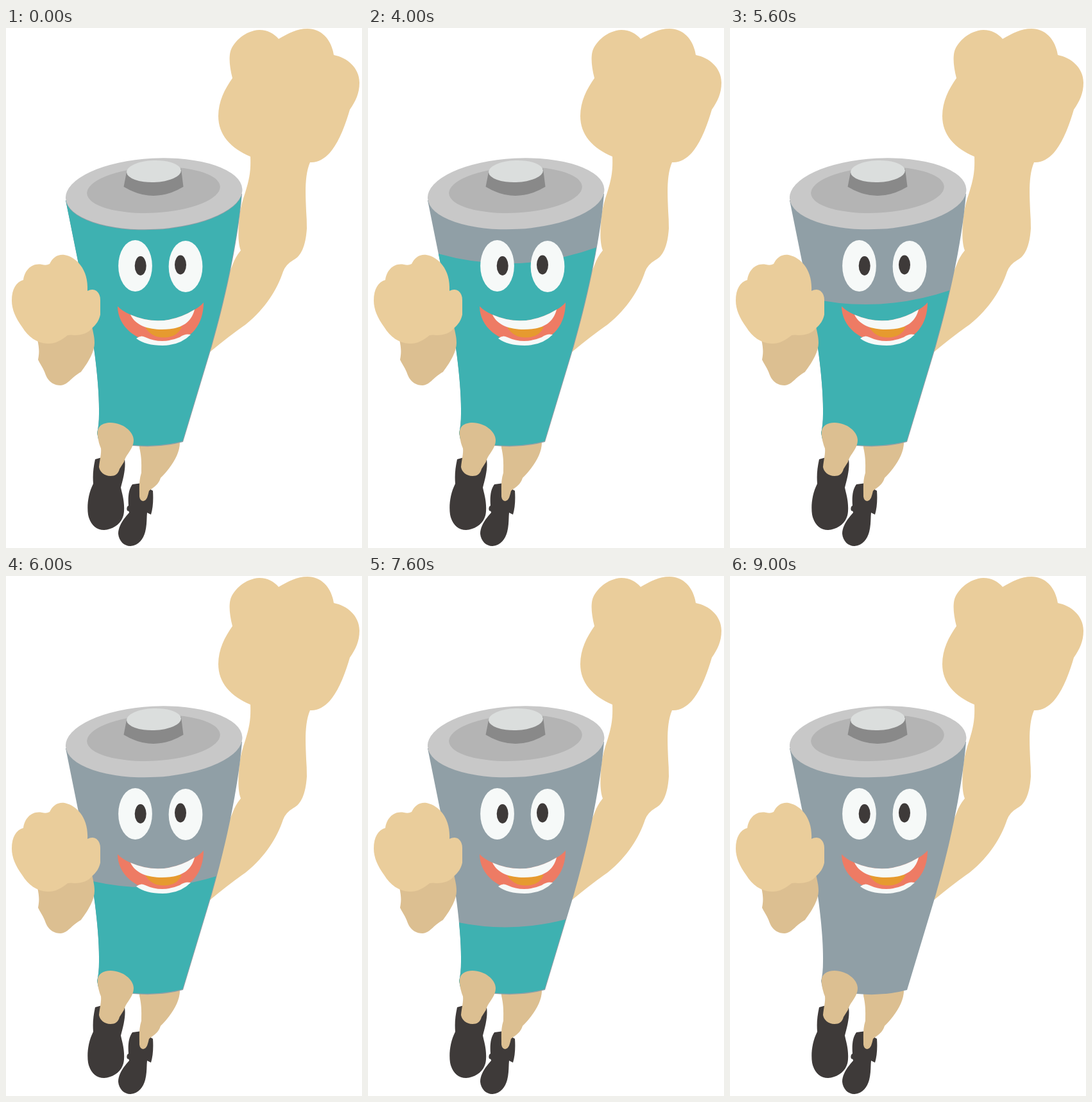
An HTML page for the animation above (10000 ms loop, 555x809 px).

```html
<!DOCTYPE html>
<html lang="en">
<head>
<meta charset="utf-8">
<title>Battery hero</title>
<style>
  html, body { margin: 0; width: 100%; height: 100%; overflow: hidden; background: #fff; }
  svg { display: block; width: 555px; height: 809px; }
  .skin { fill: #eacd9b; }
  .shade { fill: #dcbf91; }
  .boot, .pupil { fill: #3e3a39; }
  .steel { fill: #909fa6; }
  .charge { fill: #3eb1b1; }
  .white { fill: #f6f9f8; }
</style>
</head>
<body>
<svg viewBox="0 0 555 809">
  <defs>
    <path id="can" d="M93 268L112 362C130 440 146 540 145 600Q145 618 142 630L144 640Q170 650 198 650Q238 654 276 644L321 495C339 432 361 340 368 258Z"/>
    <clipPath id="canClip"><use href="#can"/></clipPath>
    <clipPath id="innerClip"><use href="#can" transform="translate(-.7 -1.3)"/></clipPath>
  </defs>

  <!-- raised arm -->
  <path class="skin" d="M381 200C350 187 331 166 331 137C331 114 341 95 353 78C349 62 347 47 350 36C355 21 373 4 395 3C408 3 418 9 425 17C441 8 453 1 470 1C494 1 508 21 511 42C532 46 551 62 551 85C551 102 545 114 536 127C529 151 519 178 505 194C496 204 485 210 474 209C465 230 467 260 468 285Q469 298 469 312C467 340 460 355 448 361Q436 368 432 379C423 406 405 436 374 461Q348 479 318 504L340 400L353 369Q357 357 366 346C361 334 362 310 364 293Q365 282 370 265C379 238 382 225 381 200Z"/>

  <!-- far leg -->
  <path class="boot" d="M197 710C191 718 190 730 191 743Q187 745 189 751Q192 751 192 754C182 765 175 776 175 787C176 798 184 806 194 806C207 805 214 795 217 784C220 772 219 763 220 754L226 757C229 747 230 735 229 720L222 716L212 708Z"/>
  <path class="shade" d="M207 630L208 653C212 670 211 680 211 692C207 705 208 715 208 729Q209 736 214 736C220 735 221 728 223 720C231 714 238 710 241 700C257 684 271 664 271 645V630Z"/>

  <use class="steel" href="#can"/>
  <g clip-path="url(#canClip)">
    <g clip-path="url(#innerClip)"><path id="charge" class="charge" d="M0 0H555V809H0Z"/></g>
    <ellipse class="steel" cx="230.7" cy="258.8" rx="137.9" ry="55.1" transform="rotate(-3 230.7 258.8)"/>
  </g>

  <!-- lid -->
  <ellipse fill="#c8c8c8" cx="230.7" cy="257.8" rx="137.9" ry="55.1" transform="rotate(-3 230.7 257.8)"/>
  <ellipse fill="#b4b4b4" cx="230" cy="252" rx="103.9" ry="35.6" transform="rotate(-3 230 252)"/>
  <path fill="#898989" d="M188 224L183.500 247Q230 275 276.500 247L273 219Z"/>
  <ellipse fill="#dbdedd" cx="230.500" cy="223" rx="42.500" ry="17" transform="rotate(-2 230.5 223)"/>

  <!-- face -->
  <ellipse class="white" cx="201.500" cy="370" rx="26.400" ry="40"/>
  <ellipse class="white" cx="280" cy="371" rx="26.400" ry="40"/>
  <ellipse class="pupil" cx="209.700" cy="370" rx="9" ry="15"/>
  <ellipse class="pupil" cx="272" cy="368.500" rx="9" ry="15"/>
  <path fill="#ee7b64" d="M174 433Q182 441 194 446Q245 468 294 438Q302 434 308 427C308 463 287 490 245 490C203 490 174 464 174 433Z"/>
  <path fill="#e69a2f" d="M217 465H274Q267 481.500 246 481.500Q226 481.500 217 465Z"/>
  <path class="white" d="M194 446Q245 468 294 438C288 462 268 469 243 469C222 469 202 463 194 446Z"/>
  <path class="white" d="M203 483Q210 477 217 481Q243 493 271 481Q279 475 288 477Q271 494 244 494Q218 494 203 483Z"/>

  <!-- front arm -->
  <path class="shade" d="M49 485C52 499 52 505 50 516C53 523 58 528 62 540C67 552 76 556 85 556C97 555 100 545 117 535C126 523 138 505 138 490C138 480 136 475 134 464Z"/>
  <path class="skin" d="M127 409Q135 405 141 409Q147 414 147 423V446C145 455 141 461 134 467C129 474 119 478 107 478Q101 477 96 478C86 486 76 492 64 491C48 490 35 481 25 465C15 451 9 438 9 424C9 406 16 395 27 392C29 377 40 365 56 368Q63 370 68 367C73 357 80 352 91 353C109 356 129 375 127 409Z"/>

  <!-- near leg -->
  <path class="boot" d="M139 671C136 685 135 695 136 709C128 725 126 743 128 757C131 772 140 781 153 781C168 780 183 770 184 752C185 735 181 725 179 715C183 700 187 685 185 671L165 664L146 669Z"/>
  <path class="shade" d="M143 634C141 620 150 614 163 614C182 614 199 628 199 641C199 655 187 663 184 675L177 686C175 694 170 697 163 697C153 697 146 690 145 683C146 672 149 662 148 654Q144 645 143 634Z"/>
</svg>
<script>
  const LOOP = 10000, HOLD = 4000, STEP = 1000;
  // charge surface: left x, left y, sag control y, right x, right y
  const levels = [
    [109, 351, 386, 357, 341],
    [123, 420, 445, 343, 408],
    [136, 475, 497, 328, 467],
    [141, 539, 556, 309, 534],
    [145, 589, 604, 293, 587]
  ];
  const surface = ([x1, y1, sag, x2, y2]) =>
    `M0 ${y1}H${x1}Q${(x1 + x2) / 2} ${sag} ${x2} ${y2}H555V809H0Z`;
  const shapes = ["M0 0H555V809H0Z", ...levels.map(surface), "M0 0"];
  const charge = document.getElementById("charge");
  let shown = 0;

  function draw() {
    const t = performance.now() % LOOP;
    const i = t < HOLD ? 0 : 1 + Math.floor((t - HOLD) / STEP);
    if (i !== shown) charge.setAttribute("d", shapes[shown = i]);
    requestAnimationFrame(draw);
  }
  draw();
</script>
</body>
</html>
```
